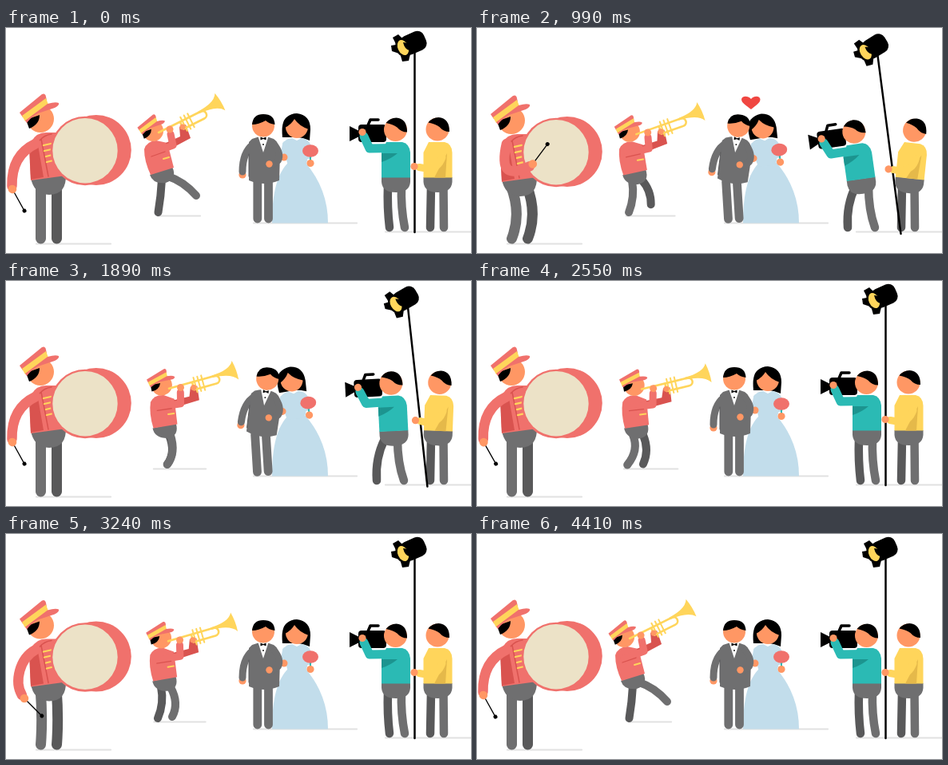
Animation, 582 px wide and 282 px high, one loop 4440 ms. Source, as an HTML page without scripts:

```html
<!DOCTYPE html>
<html lang="en">
<head>
<meta charset="utf-8">
<title>Wedding party</title>
<style>
@property --hit { syntax: "<number>"; inherits: true; initial-value: 0; }
@property --hx { syntax: "<number>"; inherits: true; initial-value: 8; }
@property --hy { syntax: "<number>"; inherits: true; initial-value: 202; }
@property --ha { syntax: "<number>"; inherits: true; initial-value: 61; }
@property --hop { syntax: "<number>"; inherits: true; initial-value: 0; }
@property --kiss { syntax: "<number>"; inherits: true; initial-value: 0; }
@property --crew { syntax: "<number>"; inherits: true; initial-value: 0; }
@property --tilt { syntax: "<number>"; inherits: true; initial-value: 0; }

html, body { margin: 0; width: 100%; height: 100%; overflow: hidden; background: #fff; }
svg {
  display: block; width: 582px; height: 282px;
  --coral: #f0716c; --rust: #d9534f; --gold: #ffd55b; --skin: #ff9764;
  --grey: #6f6f70; --dark: #59595a; --teal: #2bbab4; --blue: #c2ddeb;
  animation: kiss 4.44s infinite, crew 4.44s infinite, tilt 4.44s infinite, hop .74s infinite;
  animation-timing-function: ease-in-out;
}
.coral { fill: var(--coral); } .rust { fill: var(--rust); } .gold { fill: var(--gold); }
.skin { fill: var(--skin); } .grey { fill: var(--grey); } .teal { fill: var(--teal); } .blue { fill: var(--blue); }
.line { stroke-linecap: round; stroke-linejoin: round; stroke: #000; }
.line.coral { stroke: var(--coral); } .line.rust { stroke: var(--rust); } .line.gold { stroke: var(--gold); }
.line.grey { stroke: var(--grey); } .line.dark { stroke: var(--dark); } .line.teal { stroke: var(--teal); }
.line.blue { stroke: var(--blue); }
.line[class] { fill: none; }
.ground { stroke: #e1e1e1; stroke-width: 2.2; stroke-linecap: round; }

/* Drummer: two double beats per loop */
.drummer, .beat-arm { animation: beat 4.44s linear infinite; }
.drum-body { transform: translateY(calc(var(--hit) * 2px)); }
.stick { transform: translate(calc(var(--hx) * 1px), calc(var(--hy) * 1px)) rotate(calc(var(--ha) * 1deg)); }
.knee { animation: knee 4.44s ease-in-out infinite; }
@keyframes beat {
  0%, .7%, 14.2%, 27.7%, 57.4%, 70.9%, 84.5%, 100% {
    --hit: 0; --hx: 8; --hy: 202; --ha: 61; d: path("M37 145C14 156 7 176 7.5 198"); }
  2.7%, 12.2%, 16.2%, 25.7%, 59.5%, 68.9%, 73%, 82.4% {
    --hit: .25; --hx: 23; --hy: 206; --ha: 45; d: path("M37 145C17 156 10 185 20 202"); }
  5.2%, 10.1%, 18.7%, 23.6%, 61.9%, 66.9%, 75.5%, 80.4% {
    --hit: .65; --hx: 54; --hy: 199; --ha: -18; d: path("M37 145C27 165 28 190 50 197"); }
  7.4%, 8.8%, 20.9%, 22.3%, 64.2%, 65.5%, 77.7%, 79.1% {
    --hit: 1; --hx: 70; --hy: 170; --ha: -54; d: path("M37 145C30 176 36 188 66 173"); }
}
@keyframes knee {
  0%, .7%, 14.2%, 27.7%, 57.4%, 70.9%, 84.5%, 100% { d: path("M43.5 195Q43.5 232 43.5 264"); }
  7.4%, 8.8%, 20.9%, 22.3%, 64.2%, 65.5%, 77.7%, 79.1% { d: path("M42 197Q56 232 43.5 264"); }
}

/* Trumpeter: hops every .74s, legs alternate */
.hop { transform-origin: 196px 190px;
  transform: translate(calc(var(--hop) * 3px), calc(var(--hop) * 3px)) rotate(calc(var(--hop) * 9deg)); }
.horn { transform-origin: 191px 131px;
  transform: translate(calc(var(--hop) * 3px), calc(var(--hop) * 1px)) rotate(calc(var(--hop) * 4deg)); }
.spread { transform-origin: 212px 0; transform: scaleX(calc(1 + var(--hop) * .26)); }
.step { animation: step 1.48s linear infinite; }
.step.other { animation-delay: -.74s; }
@keyframes hop {
  0% { --hop: 0; animation-timing-function: ease-in; }
  33.8% { --hop: .54; animation-timing-function: ease-out; }
  44.6% { --hop: 1; animation-timing-function: ease-in; }
  60.8% { --hop: .73; animation-timing-function: ease-out; }
  84% { --hop: .04; }
  100% { --hop: 0; }
}
@keyframes step {
  0%, 91.9%, 100% { d: path("M195 190Q194 210 190.5 231"); }
  18.9% { d: path("M194 192Q198 212 190 231"); }
  22.3% { d: path("M195 193Q203 212 188 230.5"); }
  27.7% { d: path("M204 193Q213 215 201.5 230"); }
  30.4% { d: path("M206 193Q213 210 208 224"); animation-timing-function: ease-out; }
  42%, 50% { d: path("M203 186Q222 192 238 210"); animation-timing-function: ease-in; }
  66.9% { d: path("M206 190Q218 203 218 221"); }
  68.9% { d: path("M206 192Q217 212 208 229"); }
  72.3% { d: path("M208 193Q216 212 208 229.5"); }
  77.7% { d: path("M206 193Q213 215 202 230"); }
  80.4% { d: path("M200 192Q213 214 199 230"); }
}

/* Couple */
.groom { transform-origin: 322px 165px; transform: rotate(calc(var(--kiss) * 7deg)); }
.groom-legs { transform-origin: 322px 244px; transform: rotate(calc(var(--kiss) * -3.5deg)); }
.bride { transform-origin: 364px 185px; transform: rotate(calc(var(--kiss) * -5deg)); }
.bride-head { transform-origin: 364px 138px; transform: rotate(calc(var(--kiss) * -5deg)); }
.heart { transform-origin: 343px 94px; animation: heart 4.44s ease-in-out infinite; }
@keyframes kiss { 0%, 2.3% { --kiss: 0; } 15.8%, 43.9% { --kiss: 1; } 54%, 100% { --kiss: 0; } }
@keyframes heart {
  0%, 14.5% { transform: scale(0); }
  18.5% { transform: scale(1.15); }
  21%, 33% { transform: scale(1); }
  37%, 100% { transform: scale(0); }
}

/* Film crew */
.cameraman { transform-origin: 488px 190px;
  transform: translate(calc(var(--crew) * -7px), calc(var(--crew) * 2px)) rotate(calc(var(--crew) * -8deg)); }
.helper { transform-origin: 540px 190px;
  transform: translate(calc(var(--crew) * 1px), calc(var(--crew) * 1px)) rotate(calc(var(--crew) * 6deg)); }
.helper-arm { transform-origin: 545px 165px; transform: rotate(calc(var(--crew) * -9deg)); }
.light { transform-origin: 511px 256px;
  transform: translate(calc(var(--tilt) * 19px), calc(var(--tilt) * 2px)) rotate(calc(var(--tilt) * -7.4deg)); }
.leg-l { animation: leg-l 4.44s ease-in-out infinite; }
.leg-r { animation: leg-r 4.44s ease-in-out infinite; }
@keyframes crew { 0%, 1% { --crew: 0; } 15.4%, 31.5% { --crew: 1; } 50.5%, 100% { --crew: 0; } }
@keyframes tilt { 0% { --tilt: 0; } 19.8%, 37% { --tilt: 1; } 57%, 100% { --tilt: 0; } }
@keyframes leg-l {
  0%, 1%, 52%, 100% { d: path("M478 198Q477 225 480 250"); }
  10%, 42.5% { d: path("M474 198Q462 222 464 250"); }
}
@keyframes leg-r {
  0%, 1%, 52%, 100% { d: path("M495 198Q494 225 499 250"); }
  10%, 42.5% { d: path("M490 198Q490 228 498 250"); }
}
</style>
</head>
<body>
<svg viewBox="0 0 582 282" xmlns="http://www.w3.org/2000/svg">
  <defs>
    <g id="cap">
      <path d="M25 115L42 109Q42 121 29 126Z"/>
      <path class="coral" d="M17 106L45 83Q49 81 50 86L51 91L21 112Z"/>
      <path class="gold" d="M20 110L50 88L53 96L24 117Z"/>
      <path class="coral" d="M24 116L52 95Q62 92 66 94Q67 97 61 100L40 107Q32 111 26 119Z"/>
    </g>
    <path id="hips" class="grey" d="M0 0H36V6Q35 19 18 19Q1 19 0 6Z"/>
    <path id="hair" d="M-12 -8.500Q-7 -15 1 -15Q14.500 -14 14.500 3Q7 3 2 -3Q-3 -7 -12 -8.500Z"/>
  </defs>

  <g class="drummer">
    <path class="ground" d="M38 270.500H131"/>
    <path class="line dark knee" stroke-width="13" transform="translate(20)" d="M43.500 195V264"/>
    <path class="line grey knee" stroke-width="13" d="M43.500 195V264"/>
    <g class="drum-body">
      <path class="grey" d="M31 187L75 183Q76 209 54 209Q34 208 31 187Z"/>
      <path class="coral" d="M32 142Q38 131 50 131H63L75 185L31 191Q29 160 32 142Z"/>
      <path class="rust" d="M29 152L39 141L47 187L31 190Z"/>
      <path class="line rust" stroke-width="1.500" d="M42 141Q48 134 57 133M44 139L53 186"/>
      <path class="line gold" stroke-width="2.300" d="M47 147L56 145M48 154L57 152M50 161L58 159M51 168L59 166"/>
      <circle class="skin" cx="43" cy="114" r="17"/>
      <use href="#cap"/>
      <circle class="coral" cx="112.800" cy="153" r="44"/>
      <circle class="coral" cx="99" cy="154" r="43.300"/>
      <circle cx="99" cy="153.700" r="40.700" fill="#ece2c7"/>
    </g>
    <path class="line coral beat-arm" stroke-width="12.500" d="M37 145C14 156 7 176 7.500 198"/>
    <g class="stick">
      <path class="line" stroke-width="1.300" d="M0 0H31"/>
      <circle cx="31" r="2.500"/>
      <circle class="skin" r="5.300"/>
    </g>
  </g>

  <g>
    <path class="ground spread" d="M190 235.500H243"/>
    <path class="line dark step" stroke-width="10" d="M195 190L190 231"/>
    <path class="line grey step other" stroke-width="10" d="M203 186Q222 192 238 210"/>
    <g class="hop">
      <path class="grey" d="M180 184L208 174Q215 189 200 194Q184 196 180 184Z"/>
      <path class="coral" d="M173 152Q176 142 188 141L202 144L210 175L181 184Q173 167 173 152Z"/>
      <path class="line gold" stroke-width="2" d="M197 164L204 162"/>
      <circle class="skin" cx="184" cy="129" r="13"/>
      <use href="#cap" transform="translate(152.500 50.500) scale(.7)"/>
      <g class="horn">
        <path class="rust" d="M203 153L231 138L225 121L217 124L218 136L200 144Z"/>
        <g transform="translate(191 131) rotate(-26.600)">
          <path class="line gold" stroke-width="2.600" d="M0 0H62M30 0V10H59A5 5 0 0 0 59 0"/>
          <path class="line gold" stroke-width="2" d="M33 -5V14M38 -5V14M43 -5V14"/>
          <path class="gold" d="M56 -1.400Q80 -2 85 -12.500Q88 0 87 12.500Q80 2 56 1.400Z"/>
        </g>
        <circle class="skin" cx="221" cy="124" r="3.600"/>
        <path class="line coral" stroke-width="9" d="M184 156L209 147L206 133"/>
        <path class="line rust" stroke-width="1.300" d="M182 161L199 155"/>
        <circle class="skin" cx="205" cy="127" r="4.500"/>
      </g>
    </g>
  </g>

  <g>
    <path class="ground" d="M310 244.500H439"/>
    <path class="blue" d="M353 169C340 182 333 205 333 244.500H403Q403 202 375 169Z"/>
    <path class="line grey groom-legs" stroke-width="10.800" d="M314.800 192V239M328.500 192V239"/>
    <g class="bride">
      <g class="bride-head">
        <path d="M346 137Q344 118 351 112Q357 107 364 107Q381 109 381 127L380 141Q370 137 364 137Z"/>
      </g>
      <path class="blue" d="M346 145Q351 138 358 138L364 141L370 138Q379 139 382 148L375 173H353Z"/>
      <path class="line blue" stroke-width="8" d="M350 146L348 157M377 148L379 160"/>
      <g class="bride-head">
        <circle class="skin" cx="364" cy="124" r="14"/>
        <path d="M349 125Q350 110 364 108Q380 111 379 127Q367 123 361 114Q357 121 349 125Z"/>
      </g>
      <path class="line teal" stroke-width="2" d="M381 160V166"/>
      <ellipse class="coral" cx="381" cy="154" rx="10" ry="7.800"/>
      <circle class="skin" cx="381" cy="169.500" r="4.600"/>
      <circle class="skin" cx="348" cy="162" r="4.500"/>
    </g>
    <g class="groom">
      <circle class="skin" cx="296" cy="184" r="4.600"/>
      <path class="line grey" stroke-width="9" d="M309 146Q296 156 296 180"/>
      <path class="grey" d="M308 139Q322 133 335 139Q342 143 343 158L342 191Q323 199 304 191L304 143Z"/>
      <path class="line grey" stroke-width="8" d="M336 146Q345 157 341 166L334 171"/>
      <path fill="#fff" d="M315.500 136H328.500L322 156Z"/>
      <circle class="skin" cx="322" cy="122.500" r="14"/>
      <path d="M308 121Q309 108 322 108Q336 108 336.500 121Q329 120 325 116Q316 121 308 121Z"/>
      <path d="M318.500 136.500L322 138L325.500 136.500V140.500L322 139L318.500 140.500Z"/>
      <circle cx="322" cy="146" r=".9"/>
      <circle class="skin" cx="329.500" cy="170.500" r="4.200"/>
      <path class="line dark" stroke-width="1" d="M304 158V186"/>
    </g>
    <path class="heart" fill="#f04641" d="M343 102C337 97 331 94 331 89.500C331 85 339 84 343 89C347 84 354.500 85 354.500 89.500C354.500 94 349 97 343 102Z"/>
  </g>

  <g>
    <path class="ground" d="M475 255.500H582"/>
    <path class="line dark leg-l" stroke-width="10.500" d="M478 198L480 250"/>
    <path class="line grey leg-r" stroke-width="10.500" d="M495 198L499 250"/>
    <g class="cameraman">
      <use href="#hips" x="470" y="187"/>
      <rect x="441" y="121" width="35" height="22" rx="4"/>
      <path d="M430 123L442 129V136L430 142Z"/>
      <path class="line" stroke-width="3.500" d="M453 122L456 115H466"/>
      <path class="teal" d="M476 143H496Q505 145 506 156V187.500H470V156Z"/>
      <path fill="#1c948f" d="M470 157H490Q482 164 470 168Z"/>
      <path class="line teal" stroke-width="11" d="M486 150.500L455 151L448 136"/>
      <circle class="skin" cx="446" cy="130.500" r="4.600"/>
      <circle class="skin" cx="487.500" cy="127.500" r="14.500"/>
      <use href="#hair" x="487.500" y="127.500"/>
    </g>
    <path class="line dark" stroke-width="10.500" d="M532 198L531 250"/>
    <path class="line grey" stroke-width="10.500" d="M547.500 198L548 250"/>
    <g class="light">
      <path class="line" stroke-width="2.500" stroke-linecap="butt" d="M511.500 25V256"/>
      <path d="M484 12L491 8L498 15L488 20ZM482 22L488 21L492 32L483 29ZM494 35L506 33L504 41L496 42Z"/>
      <g transform="translate(497 24.500) rotate(-24)">
        <rect x="-2" y="-12.500" width="32" height="25" rx="9"/>
        <ellipse rx="9" ry="13"/>
        <ellipse class="gold" rx="6.500" ry="10"/>
      </g>
      <path d="M497 18Q507 18 505 28Q499 27 497 18Z"/>
    </g>
    <g class="helper">
      <use href="#hips" x="522.500" y="187"/>
      <path class="gold" d="M529 143H549Q558 145 558.500 156V187.500H522.500V156Z"/>
      <path fill="#e5b94a" d="M552 157L550 187.500H536Z"/>
      <g class="helper-arm">
        <path class="line gold" stroke-width="9" d="M546 162Q540 180 517 174.500"/>
        <circle class="skin" cx="511" cy="173.500" r="4.600"/>
      </g>
      <circle class="skin" cx="540" cy="127" r="14.500"/>
      <use href="#hair" x="540.500" y="127"/>
    </g>
  </g>
</svg>
</body>
</html>
```
